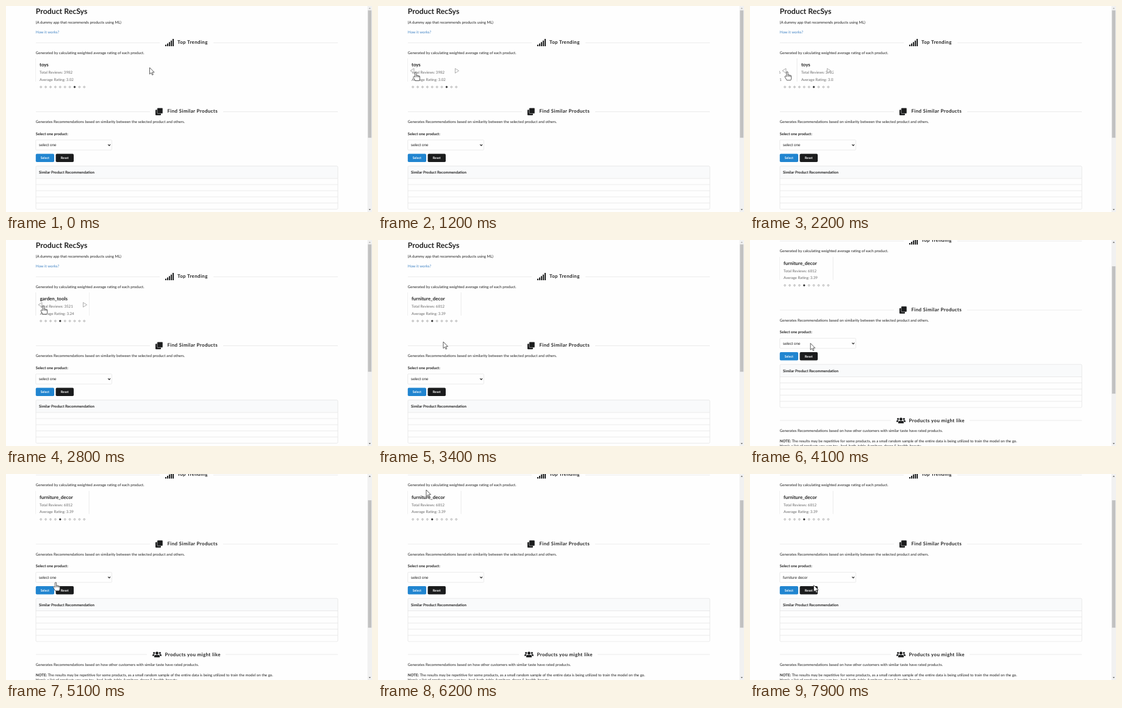
Recreate the animation shown at these times as an HTML page. Size 600x338 px, loop 8 s.

```html
<!DOCTYPE html>
<html lang="en">
<head>
<meta charset="utf-8">
<title>Product RecSys</title>
<style>
  html, body { margin: 0; width: 100%; height: 100%; overflow: hidden; background: #fefefe; }
  svg { display: block; }
  text { font: 6.15px Lato, sans-serif; fill: #222; text-rendering: geometricPrecision; white-space: pre; }
  .b { font-weight: 700; }
  .h1 { font-size: 12.3px; }
  .h3 { font-size: 7.9px; }
  .spaced { letter-spacing: .05em; }
  .grey { fill: #6a6a6a; }
  .link { fill: #4183c4; }
  .btn { font-size: 5.27px; fill: #fff; text-anchor: middle; }
  .field { font: 6.25px "Liberation Sans", Arial, sans-serif; }
  .line { stroke: #dedede; stroke-width: .6; fill: none; }
  .arrow { fill: #fff; fill-opacity: .7; stroke: #999; stroke-width: .8; }
  .dot { fill: #fff; stroke: #888; stroke-width: .7; }
  .dot.on { fill: #333; stroke: #333; }
  .cursor { fill: #fff; stroke: #333; stroke-width: .8; stroke-linejoin: round; }
</style>
</head>
<body>
<svg id="stage" width="600" height="338" viewBox="0 0 600 338">
  <g id="page">
    <text class="b h1" x="48.8" y="12.5">Product RecSys</text>
    <text x="48.8" y="28.5">(A dummy app that recommends products using ML)</text>
    <text class="link" x="48.8" y="45.3">How it works?</text>

    <path class="line" d="M49 60.3H252M340 60.3H544"/>
    <path id="bars" fill="#1b1c1d"/>
    <text class="b h3 spaced" x="281" y="61.9">Top Trending</text>
    <text x="48.8" y="78.8">Generated by calculating weighted average rating of each product.</text>
    <svg x="48" y="86" width="89" height="40"><g id="track"></g></svg>
    <g id="dots"></g>
    <path id="nav" class="arrow" d="M53 106.3L59 102.5V110.1ZM132.5 106.3L126.5 102.5V110.1Z"/>

    <path class="line" d="M49 173.5H236M356 173.5H544"/>
    <g fill="#1b1c1d">
      <rect x="245" y="170.3" width="9" height="9" rx="1"/>
      <rect x="247.8" y="167.2" width="9.2" height="9.2" rx="1.2" stroke="#fefefe" stroke-width=".5"/>
    </g>
    <text class="b h3 spaced" x="264.5" y="175.4">Find Similar Products</text>
    <text x="48.8" y="192.2">Generates Recommendations based on similarity between the selected product and others.</text>
    <text class="b" x="48.8" y="211.5">Select one product:</text>
    <rect class="line" x="48.8" y="219.8" width="124.6" height="16.5" rx="1"/>
    <text id="choice" class="field" x="54" y="230.1"></text>
    <path d="M167.3 227.2L169.2 229.1 171.1 227.2" fill="none" stroke="#222" stroke-width="1.1"/>
    <rect x="48.8" y="242.6" width="30.2" height="13.5" rx="1.8" fill="#2185d0"/>
    <text class="b btn" x="63.8" y="251.2">Select</text>
    <rect x="81.6" y="242.6" width="29.4" height="13.5" rx="1.8" fill="#1b1c1d"/>
    <text class="b btn" x="96.2" y="251.2">Reset</text>

    <rect x="49" y="262.6" width="495" height="20.4" rx="1.8" fill="#f9fafb"/>
    <rect class="line" x="49" y="262.6" width="495" height="70.8" rx="1.8"/>
    <path class="line" d="M49 283H544M49 293H544M49 303.1H544M49 313.1H544M49 323.2H544"/>
    <text class="b" x="54" y="275.1">Similar Product Recommendation</text>

    <path class="line" d="M49 354.6H231M360 354.6H544"/>
    <g fill="#1b1c1d">
      <circle cx="242.7" cy="352" r="1.6"/>
      <circle cx="252.3" cy="352" r="1.6"/>
      <circle cx="247.5" cy="352.4" r="2.4"/>
      <path d="M240 357V356Q240 354.1 242 354.1H243.8Q243 355.2 242.6 357ZM255 357V356Q255 354.1 253 354.1H251.2Q252 355.2 252.4 357ZM243 359.3V358Q243 355.3 245.5 355.3H249.5Q252 355.3 252 358V359.3Z"/>
    </g>
    <text class="b h3 spaced" x="260.5" y="357.1">Products you might like</text>
    <text x="48.8" y="373.7">Generates Recommendations based on how other customers with similar taste have rated products.</text>
    <text x="48.8" y="390.1"><tspan class="b">NOTE:</tspan> The results may be repetitive for some products, as a small random sample of the entire data is being utilized to train the model on the go.</text>
    <text x="48.8" y="398.9">Here's a list of products you can try - bed_bath_table, furniture_decor &amp; health_beauty</text>
  </g>

  <rect x="592.5" width="7.5" height="338" fill="#f1f1f1"/>
  <rect id="thumb" x="593.4" width="5.7" height="209" fill="#c1c1c1"/>
  <path id="up" d="M594.6 4.6L596.3 2.8 598 4.6Z"/>
  <path d="M594.6 333.2L596.3 335 598 333.2Z" fill="#505050"/>

  <path id="cursor" class="cursor"/>
</svg>
<script>
  const $ = id => document.getElementById(id);
  const LOOP = 8000, STEP = 100, SLIDE = 88, SLIDE_MS = 300;
  const CLICKS = [2085, 2485, 2785];
  const SLIDES = {
    4: ['furniture_decor', 6812, '3.39'],
    5: ['garden_tools', 3521, '3.24'],
    6: ['perfumery', 2796, '3.11'],
    7: ['toys', 3982, '3.02']
  };
  const ARROW = 'M0 0V10.8L2.5 8.5 4.2 12.2 5.8 11.5 4.2 7.8H7.6Z';
  const HAND = 'M-1.2 8V1Q-1.2 -.2 0 -.2T1.2 1V5Q2.6 4.3 3.3 5.4 4.7 4.8 5.2 6 6.8 5.7 6.8 7.4V10Q6.8 12 5.8 13.8H-.7Q-1.8 11.6 -3.7 8.7C-4.3 7.4 -3.2 6.4 -2.2 7.1Z' +
    'M1.2 5V8M3.3 5.4V8M5.2 6V8.3';

  // Key poses: [time, value, ...]
  const POINTER = [
    [0, 235.5, 101], [900, 62, 109], [1900, 61, 108], [2900, 61, 108], [3300, 107, 167],
    [3700, 107, 167], [4400, 94, 171], [4600, 94, 171], [5100, 81.5, 178], [5300, 82, 172],
    [6200, 79, 26], [6700, 78, 36], [7100, 80, 46], [7800, 104.5, 182.5], [8000, 104.5, 182.5]
  ];
  const SCROLL = [[0, 0], [3400, 0], [3500, 21], [3600, 50.8], [3700, 58.5], [8000, 58.5]];

  const smooth = p => p * p * (3 - 2 * p);
  const clamp = p => Math.min(1, Math.max(0, p));

  function pose(keys, t, ease = p => p) {
    const i = keys.findIndex(k => k[0] > t);
    const a = keys[i - 1], b = keys[i];
    const p = ease((t - a[0]) / (b[0] - a[0]));
    return a.slice(1).map((v, n) => v + (b[n + 1] - v) * p);
  }

  $('bars').setAttribute('d', [2.4, 4.4, 6.8, 9.2, 12]
    .map((h, i) => `M${261 + 3 * i} 66v${-h}h2v${h}z`).join(''));

  $('track').innerHTML = Object.entries(SLIDES).map(([i, [name, reviews, rating]]) =>
    `<g transform="translate(${i * SLIDE})">
      <path class="line" d="M.2 0V38"/>
      <text class="b h3" x="7" y="13.2">${name}</text>
      <text class="grey" x="7" y="25.2">Total Reviews: ${reviews}</text>
      <text class="grey" x="7" y="36.8">Average Rating: ${rating}</text>
    </g>`).join('');

  $('dots').innerHTML = Array.from({ length: 10 }, (_, i) =>
    `<circle cx="${57.2 + 7.9 * i}" cy="132.9" r="1.3"/>`).join('');

  function draw(t) {
    const [scroll] = pose(SCROLL, t);
    const [x, y] = pose(POINTER, t, smooth);
    const active = 7 - CLICKS.filter(c => c <= t).length;
    const slide = 7 - CLICKS.reduce((sum, c) => sum + smooth(clamp((t - c) / SLIDE_MS)), 0);
    const inCarousel = scroll === 0 && x < 137 && y > 86 && y < 138;
    const onArrow = inCarousel && x < 68;
    const onButton = t >= 5000 && t < 5300;

    $('page').setAttribute('transform', `translate(0 ${-scroll})`);
    $('thumb').setAttribute('y', 7.2 + scroll * .615);
    $('up').setAttribute('fill', scroll ? '#505050' : '#a3a3a3');
    $('track').setAttribute('transform', `translate(${-slide * SLIDE})`);
    [...$('dots').children].forEach((d, i) => d.setAttribute('class', i === active ? 'dot on' : 'dot'));
    $('nav').setAttribute('visibility', inCarousel ? 'visible' : 'hidden');
    $('choice').textContent = t < 7100 ? 'select one' : 'furniture decor';
    $('cursor').setAttribute('d', onArrow || onButton ? HAND : ARROW);
    $('cursor').setAttribute('transform', `translate(${x} ${y})`);
  }

  const start = performance.now();
  function tick() {
    const t = (performance.now() - start) % LOOP;
    draw(Math.floor(t / STEP) * STEP);
    requestAnimationFrame(tick);
  }
  tick();
</script>
</body>
</html>
```
